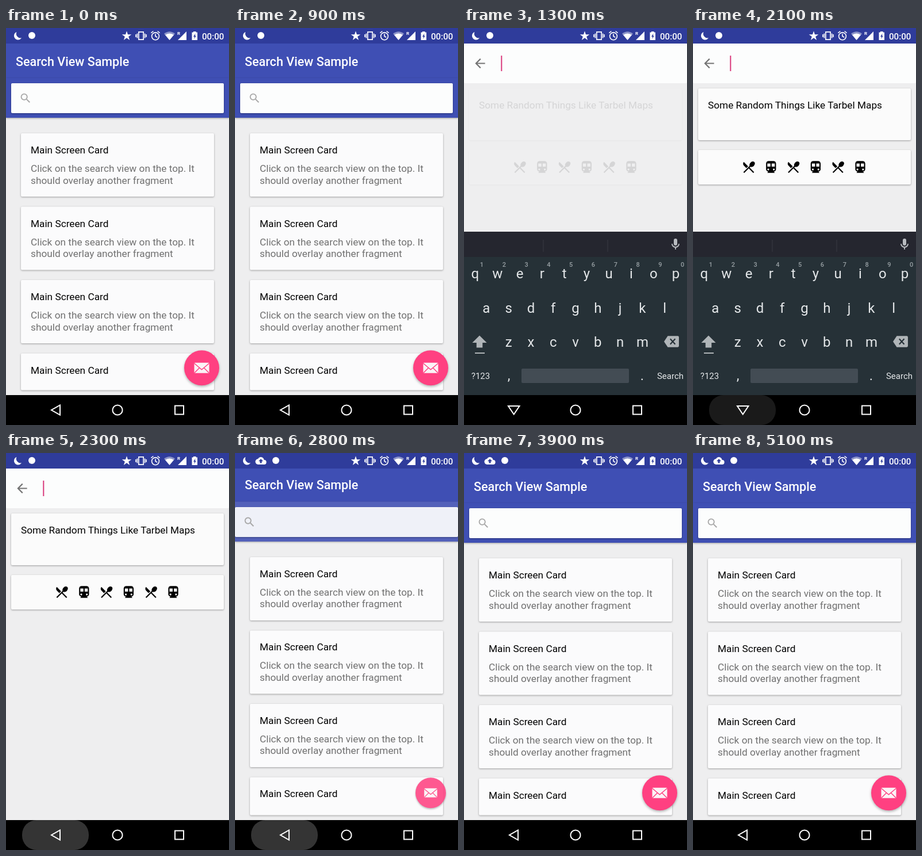
Write an HTML page that moves like this. It is 388 px wide and 690 px high and loops after 5.2 s.

```html
<!DOCTYPE html>
<html lang="en">
<head>
<meta charset="utf-8">
<title>Search view sample</title>
<style>
html, body { margin: 0; width: 100%; height: 100%; overflow: hidden; background: #000; }
svg { display: block; width: 100vw; height: 100vh; }
text { font-family: Roboto, sans-serif; font-size: 17.24px; }
.lift { filter: drop-shadow(0 1.8px 1.4px rgba(0,0,0,.34)); }
.fill { fill: currentColor; }
.line { fill: none; stroke: currentColor; stroke-width: 2; }
.mid { text-anchor: middle; }
</style>
</head>
<body>
<svg id="stage" viewBox="0 0 388 690" color="#fff"></svg>
<script>
const LOOP = 5200, STEP = 100;

const range = (n, f) => Array.from({ length: n }, (_, i) => f(i));
const rect = (x, y, w, h, fill, more = '') =>
  `<rect x="${x}" y="${y}" width="${w}" height="${h}" fill="${fill}" ${more}/>`;
const disc = (x, y, r, fill = 'currentColor') => `<circle cx="${x}" cy="${y}" r="${r}" fill="${fill}"/>`;
const line = (d, w = 2) => `<path class="line" d="${d}" style="stroke-width:${w}"/>`;
const solid = d => `<path class="fill" d="${d}"/>`;
const text = (x, y, s, fill, more = '') => `<text x="${x}" y="${y}" fill="${fill}" ${more}>${s}</text>`;
const size = px => `style="font-size:${px}px"`;

const starPoints = range(10, i => {
  const a = i * Math.PI / 5, r = i % 2 ? 4 : 10.4;
  return `${r * Math.sin(a)},${-r * Math.cos(a)}`;
}).join(' ');

// Icons are drawn around their own centre, in a box 24 units wide.
const icons = {
  star: `<polygon class="fill" points="${starPoints}"/>`,
  moon: solid('M-2 -9A9 9 0 1 0 9 4A9.500 9.500 0 0 1 -2 -9z'),
  vibrate: line('M-5 -8h10v16h-10z') + line('M-8 -5v10M8 -5v10M-11 -3v6M11 -3v6'),
  alarm: line('M0 -4v5l4 2.500M-9.500 -6l5 -4M9.500 -6l-5 -4') + '<circle class="line" cy="1" r="8"/>',
  cloud: disc(-6, 2, 6) + disc(0, -1, 7) + disc(7, 3, 5) + rect(-6, 2, 13, 6, 'currentColor') +
    '<path d="M-2 5v-4h-3l5 -5 5 5h-3v4z" fill="#2f3c9b"/>',
  search: '<circle class="line" cx="-2.500" cy="-2.500" r="5.500"/>' + line('M2 2L7.800 7.800', 2.2),
  back: line('M8 0H-6.500M.7 -7.300L-6.600 0L.7 7.300'),
  dining: line('M-8 8.500L4 -3.500M8 8.500L0 .5') + solid('M-8 -8.500L-1 -1.500L-3.900 1.300L-8 -2.800Q-10.200 -5.500 -8 -8.500z') +
    '<ellipse class="fill" cx="5.500" cy="-4.800" rx="3.700" ry="5" transform="rotate(45 5.500 -4.800)"/>',
  train: rect(-8, -10, 16, 17, 'currentColor', 'rx="4"') + solid('M-4 6h8l2 3h-12z') +
    rect(-6, -6, 5, 5, '#fbfbfb') + rect(1, -6, 5, 5, '#fbfbfb') +
    disc(-4.5, 3.5, 1.5, '#fbfbfb') + disc(4.5, 3.5, 1.5, '#fbfbfb'),
  mic: rect(-3, -10, 6, 12, 'currentColor', 'rx="3"') + line('M-6 -1a6 6 0 0 0 12 0M0 5v4', 1.8),
  erase: solid('M-12 0L-6 -9H10q2 0 2 2V7q0 2 -2 2H-6z') +
    '<path d="M-2 -4.300L6 4.300M6 -4.300L-2 4.300" stroke="#263137" stroke-width="2"/>',
  shift: solid('M0 -10l12 12h-7v8h-10v-8h-7z')
};
const icon = (name, x, y, s, color = '#fff', id = name) =>
  `<g class="${id}" color="${color}" transform="translate(${x} ${y}) scale(${s})">${icons[name]}</g>`;

const card = i => {
  const y = 183 + 127.5 * i;
  return rect(26, y, 336, 110, '#fbfbfc', 'class="lift card" rx="2"') +
    text(43, y + 35, 'Main Screen Card', '#000') +
    `<g class="body">${text(43, y + 67, 'Click on the search view on the top. It', '#707070')}
    ${text(43, y + 87.5, 'should overlay another fragment', '#707070')}</g>`;
};

const status = rect(0, 0, 388, 27, '#2f3c9b') +
  icon('moon', 20, 14, .78) + icon('cloud', 45, 13.5, .8) +
  '<circle class="dot" cx="45" cy="13" r="6" fill="#fff"/>' +
  icon('star', 210, 14, .84) + icon('vibrate', 235, 13.5, .82) + icon('alarm', 260, 13.5, .8) +
  `<path class="fill" d="M275 10Q284.500 2.500 294 10L284.500 21z" opacity=".45"/>
  ${solid('M277 12Q284.500 7 292 12L284.500 21z')}${solid('M314 6v15h-15z')}
  ${solid('M326 6v1.500h-2.500v13.500h9.500v-13.500h-2.500v-1.500z')}
  <path d="M329.500 9.500l-3.500 5.500h2l-.7 4 3.500-5.500h-2z" fill="#2f3c9b"/>` +
  text(298, 11.5, 'R', '#fff', `font-weight="700" ${size(8)}`) +
  text(341, 19.5, '00:00', '#fff', `font-weight="500" ${size(15.1)}`);

const header = `<g class="tools">${rect(0, 27, 388, 60, '#3f4fb4')}
  ${text(17, 65.5, 'Search View Sample', '#fff', `font-weight="500" ${size(21.56)}`)}</g>
  <g class="holder"><g class="lift">${rect(0, 87, 388, 69, '#3f4fb4')}</g></g>`;

const panel = (y, h) => rect(9, y, 370, h, '#fbfbfb', 'class="lift" rx="2"');
const content = `<g class="content">${panel(105, 90)}${panel(212, 60)}
  ${text(26, 140, 'Some Random Things Like Tarbel Maps', '#000')}
  ${range(6, i => icon(i % 2 ? 'train' : 'dining', 97 + 38.8 * i, 242, 1.08, '#000')).join('')}</g>`;

const bar = `<rect class="bar" rx="2" fill="#fcfdfd"/>
  <g class="tip">${icon('search', 25, 0, .93, '#a8a8a8', 'lens')}${icon('back', 28, 0, 1.08, '#737373', 'arrow')}
  ${rect(64.3, -13.5, 2, 27, '#d93a7c', 'class="caret"')}</g>`;

const fab = `<g class="fab"><circle r="30.5" fill="#ff4081" style="filter:drop-shadow(0 2.5px 2px rgba(0,0,0,.3))"/>
  ${rect(-13, -9, 26, 18, '#fbf3f6', 'rx="1.5"')}
  <path d="M-13 -8L0 3L13 -8M-12.500 8.500L-4 0M12.500 8.500L4 0" fill="none" stroke="#ff4081" stroke-width="1.5"/></g>`;

const key = (x, y, s, px) => text(x, y, s, '#e4e7e9', `class="mid" ${size(px)}`);
const rows = ['qwertyuiop', 'asdfghjkl', 'zxcvbnm'].map((row, r) =>
  [...row].map((c, i) => key(19.4 * (r + 1) + 38.8 * i + (r > 1 ? 19.4 : 0), 435 + 59.5 * r, c, 24)).join('')).join('');
const digits = range(10, i =>
  text(31 + 38.8 * i, 415, (i + 1) % 10, '#98a0a4', `class="mid" font-weight="500" ${size(11)}`)).join('');
const keyboard = `<g class="keys">${rect(0, 354, 388, 284, '#263137')}${rect(0, 354, 388, 44, '#25262f')}
  ${rect(137.5, 368, 1, 21, '#3a3b45')}${rect(249.5, 368, 1, 21, '#3a3b45')}
  ${icon('mic', 368, 376, 1, '#b9bcc0')}${rows}${digits}
  ${icon('shift', 27, 545, 1.05, '#b0b5b8')}${rect(19, 564, 17, 2, '#b0b5b8')}
  ${icon('erase', 361, 545, 1.08, '#b0b5b8')}
  ${key(29, 610, '?123', 15)}${key(78, 612, ',', 24)}${rect(100, 592, 187, 25, '#434c54', 'rx="2"')}
  ${key(310, 612, '.', 24)}${key(359, 610, 'Search', 15)}</g>`;

const nav = rect(0, 638, 388, 52, '#000') + rect(28, 638, 116, 52, '#343434', 'class="ripple" rx="25"') +
  `<g class="left">${line('M94 655.500v17l-15-8.500z')}</g><g class="down">${line('M77 657h19.500l-9.750 14.500z')}</g>
  <circle class="line" cx="194" cy="664" r="8.6"/>` + line('M294 656.500h15v15h-15z');

document.getElementById('stage').innerHTML = rect(0, 0, 388, 690, '#eeeeef') +
  `<g class="main"><g class="cards">${range(4, card).join('')}</g><g class="head">${header}</g></g>` +
  content + bar + fab + status + keyboard + nav;

const $ = name => document.querySelector('.' + name);
const set = (el, attrs) => { for (const k in attrs) el.setAttribute(k, attrs[k]); };
const fade = (name, v) => set($(name), { opacity: v });
const move = (name, x, y, s = 1) => set($(name), { transform: `translate(${x} ${y}) scale(${s})` });
const cards = [...document.querySelectorAll('.card')];
const bodies = [...document.querySelectorAll('.body')];

const ramp = (t, a, b) => Math.min(1, Math.max(0, (t - a) / (b - a)));
const ease = p => p * p * (3 - 2 * p);

function draw(t) {
  // Rises from 0 to 1 between a and b, falls back between c and d.
  const span = (a, b, c, d) => ramp(t, a, b) - ramp(t, c, d);

  const dy = -54 * ease(span(900, 1100, 2500, 2840));
  move('cards', 0, dy);
  move('head', 0, dy);
  cards.forEach((c, i) => {
    const h = Math.min(110, 446.5 - 127.5 * i - dy);
    set(c, { height: h });
    set(bodies[i], { opacity: h > 90 ? 1 : 0 });
  });

  const head = 1 - span(900, 1160, 2500, 2840);
  fade('holder', head);
  fade('tools', 1 - span(900, 1160, 2500, 2800));
  fade('main', 1 - span(1100, 1300, 2500, 2700));
  fade('content', span(1280, 1480, 2500, 2600));

  const wide = span(1100, 1300, 2800, 3000);
  const tall = span(1100, 1300, 2500, 2700);
  const x = 9 - 9 * wide, y = 96 + dy - 15 * tall, h = 52 + 17 * tall;
  set($('bar'), { x, y, width: 388 - 2 * x, height: h, opacity: 1 - .7 * head * (1 - head) });
  $('bar').classList.toggle('lift', tall < .8);
  move('tip', x, y + h / 2);

  const arrow = span(900, 1200, 2500, 2700);
  fade('arrow', arrow);
  fade('lens', Math.max(0, 1 - 1.5 * arrow));
  fade('caret', t >= 1100 && (t - 1100) % 1000 < 500 ? arrow : 0);

  const fab = 1 - span(900, 1150, 2600, 2830);
  move('fab', 340.5, 590.7, fab);
  fade('fab', fab);

  move('keys', 0, 284 * (1 - ease(span(1100, 1300, 2100, 2300))));
  const typing = t >= 1000 && t < 2200;
  fade('down', +typing);
  fade('left', +!typing);
  fade('ripple', span(2000, 2200, 2800, 3100));

  const upload = t >= 2600;
  fade('cloud', +upload);
  set($('dot'), { cx: upload ? 71 : 45 });
}

function tick() {
  const t = performance.now() % LOOP;
  draw(Math.floor(t / STEP) * STEP);
  requestAnimationFrame(tick);
}
tick();
</script>
</body>
</html>
```
